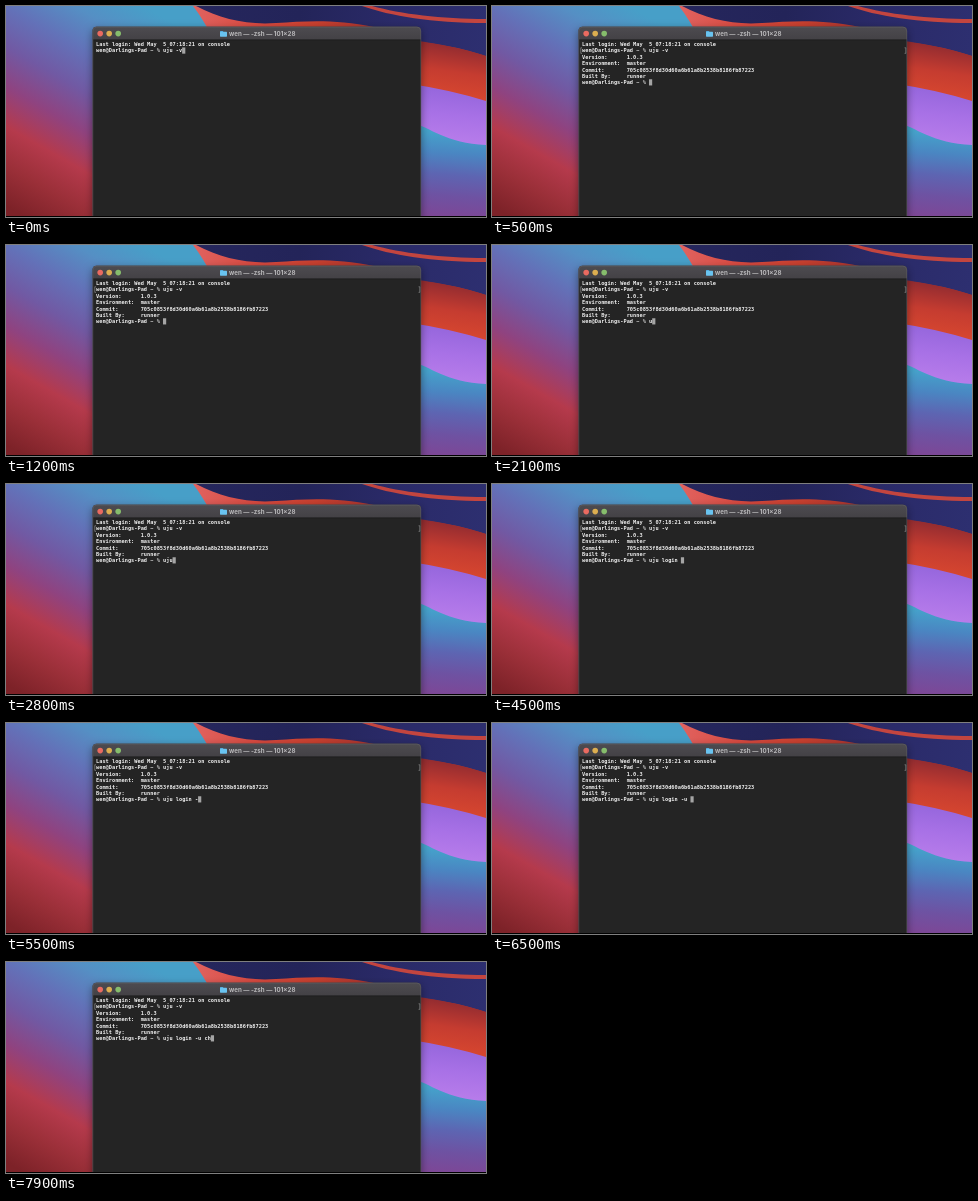
An HTML page with a canvas for the animation above (8000 ms loop, 480 px wide and 211 px high).

```html
<!DOCTYPE html>
<html lang="en">
<head>
<meta charset="utf-8">
<title>Terminal</title>
<style>
html, body { margin: 0; width: 100%; height: 100%; overflow: hidden; background: #242424; }
canvas { display: block; width: 480px; height: 211px; }
</style>
</head>
<body>
<canvas id="stage"></canvas>
<script>
const W = 480, H = 211, LOOP = 8000;
const canvas = document.getElementById('stage');
const dpr = window.devicePixelRatio || 1;
canvas.width = Math.round(W * dpr);
canvas.height = Math.round(H * dpr);
const ctx = canvas.getContext('2d');

const COL = 3.19, ROW = 6.36, LEFT = 90, TOP = 38.2;
const MONO = 'bold 53px "DejaVu Sans Mono", monospace';
const PROMPT = 'wen@Darlings-Pad ~ % ';
const LOGIN = 'Last login: Wed May  5 07:18:21 on console';
const OUTPUT = [
  'Version:      1.0.3',
  'Environment:  master',
  'Commit:       705c0853f8d30d60a6b61a8b2538b8186fb87223',
  'Built By:     runner'
];
const ENTER = 500;
const COMMAND = 'uju login -u ch';
// one key press time per character of COMMAND
const KEYS = [2000, 2300, 2600, 2900, 3400, 3600, 3800, 4000, 4200, 4400,
  5300, 5700, 6100, 7300, 7700];

function linear(x0, y0, x1, y1, ...colors) {
  const g = ctx.createLinearGradient(x0, y0, x1, y1);
  colors.forEach((c, i) => g.addColorStop(i / (colors.length - 1), c));
  return g;
}

function shape(path, fill) {
  ctx.fillStyle = fill;
  ctx.fill(new Path2D(path));
}

function box(x, y, w, h, r, fill) {
  ctx.beginPath();
  ctx.roundRect(x, y, w, h, r);
  ctx.fillStyle = fill;
  ctx.fill();
}

function dot(x, y, r, fill) {
  ctx.beginPath();
  ctx.arc(x, y, r, 0, Math.PI * 2);
  ctx.fillStyle = fill;
  ctx.fill();
}

// Laid out at ten times the size so glyph advances stay fractional
function label(str, x, y, font, fill) {
  ctx.save();
  ctx.translate(x, y);
  ctx.scale(0.1, 0.1);
  ctx.font = font;
  ctx.fillStyle = fill;
  ctx.textBaseline = 'alphabetic';
  ctx.fillText(str, 0, 0);
  ctx.restore();
}

function wallpaper() {
  // left hill: cyan through violet to dark red
  shape('M0 0H240V211H0Z', linear(120, -10, 0, 200,
    '#479fc8', '#558fc4', '#6371b8', '#7159a3', '#8f4380', '#b53a4c', '#9a2f38', '#7d2228'));
  // red ridge and the navy sky above it
  shape('M187 0H480V100H240Q206 24 187 0Z',
    linear(190, 0, 370, 20, '#e0625f', '#d94a40', '#c9402f', '#a83430'));
  shape('M190 0C215 13 240 19 270 17S330 13 368 21L415 36Q450 40 480 50V0Z',
    linear(200, 0, 480, 30, '#25265c', '#232459', '#2a2a68', '#2d2f70'));
  shape('M356 0C385 10 425 17 480 17V13C435 13 395 8 366 0Z', '#c3453f');
  // bands right of the window
  shape('M405 34Q450 40 480 50V100H405Z',
    linear(440, 36, 432, 92, '#8e2a30', '#c53c30', '#d9482f'));
  shape('M405 78Q445 84 480 95V150H405Z',
    linear(440, 82, 434, 134, '#9566dc', '#a871e6', '#b77cea'));
  shape('M405 116C425 122 440 137 480 139V211H405Z',
    linear(446, 126, 440, 211, '#45a3cb', '#4a86c2', '#5d65b2', '#6e52a2', '#7d4796'));
}

function frame() {
  ctx.save();
  ctx.shadowColor = 'rgba(0,0,0,.45)';
  ctx.shadowBlur = 8 * dpr;
  ctx.shadowOffsetY = 3 * dpr;
  box(86.6, 20.8, 328.4, 220, 4, '#242424');
  ctx.restore();
  box(86.6, 20.8, 328.4, 13, [4, 4, 0, 0], linear(0, 21, 0, 34, '#4d4b50', '#434145'));
  ctx.fillStyle = '#171717';
  ctx.fillRect(87, 33.6, 328, 0.6);
  ctx.beginPath();
  ctx.roundRect(86.8, 21, 328, 220, 4);
  ctx.lineWidth = 0.5;
  ctx.strokeStyle = '#66646a';
  ctx.stroke();

  ['#ea6a60', '#dcae50', '#86bd6c'].forEach((c, i) => dot(94.2 + i * 9, 27.6, 2.8, c));
  box(214, 25, 3.2, 2, 0.5, '#4fa9dc');
  box(214, 25.7, 7, 5, 0.6, '#69c3f0');
  label('wen — -zsh — 101×28', 223, 30, 'bold 62px Inter, sans-serif', '#b9b8ba');
}

function line(str, row) {
  label(str, LEFT, TOP + row * ROW + 1.9, MONO, '#f0f0f0');
}

function cursor(col, row) {
  ctx.fillStyle = '#a5a5a5';
  ctx.fillRect(LEFT + col * COL, TOP + row * ROW - 3.1, COL, 6.2);
}

function marks(row) {
  const y = TOP + row * ROW - 2.8;
  ctx.strokeStyle = '#a0a0a0';
  ctx.lineWidth = 0.6;
  ctx.stroke(new Path2D(`M90 ${y}h-1.2v5.6h1.2M412.6 ${y}h1.2v5.6h-1.2`));
}

function terminal(t) {
  const first = PROMPT + 'uju -v';
  line(LOGIN, 0);
  line(first, 1);
  if (t < ENTER) {
    cursor(first.length, 1);
    return;
  }
  marks(1);
  OUTPUT.forEach((str, i) => line(str, i + 2));
  const typed = PROMPT + COMMAND.slice(0, KEYS.filter(k => k <= t).length);
  line(typed, 6);
  cursor(typed.length, 6);
}

const start = performance.now();
function draw(now) {
  const t = Math.max(0, now - start) % LOOP;
  ctx.setTransform(dpr, 0, 0, dpr, 0, 0);
  wallpaper();
  frame();
  terminal(t);
  ctx.fillStyle = '#000';
  ctx.fillRect(0, 210, W, 1);
  requestAnimationFrame(draw);
}
requestAnimationFrame(draw);
</script>
</body>
</html>
```
